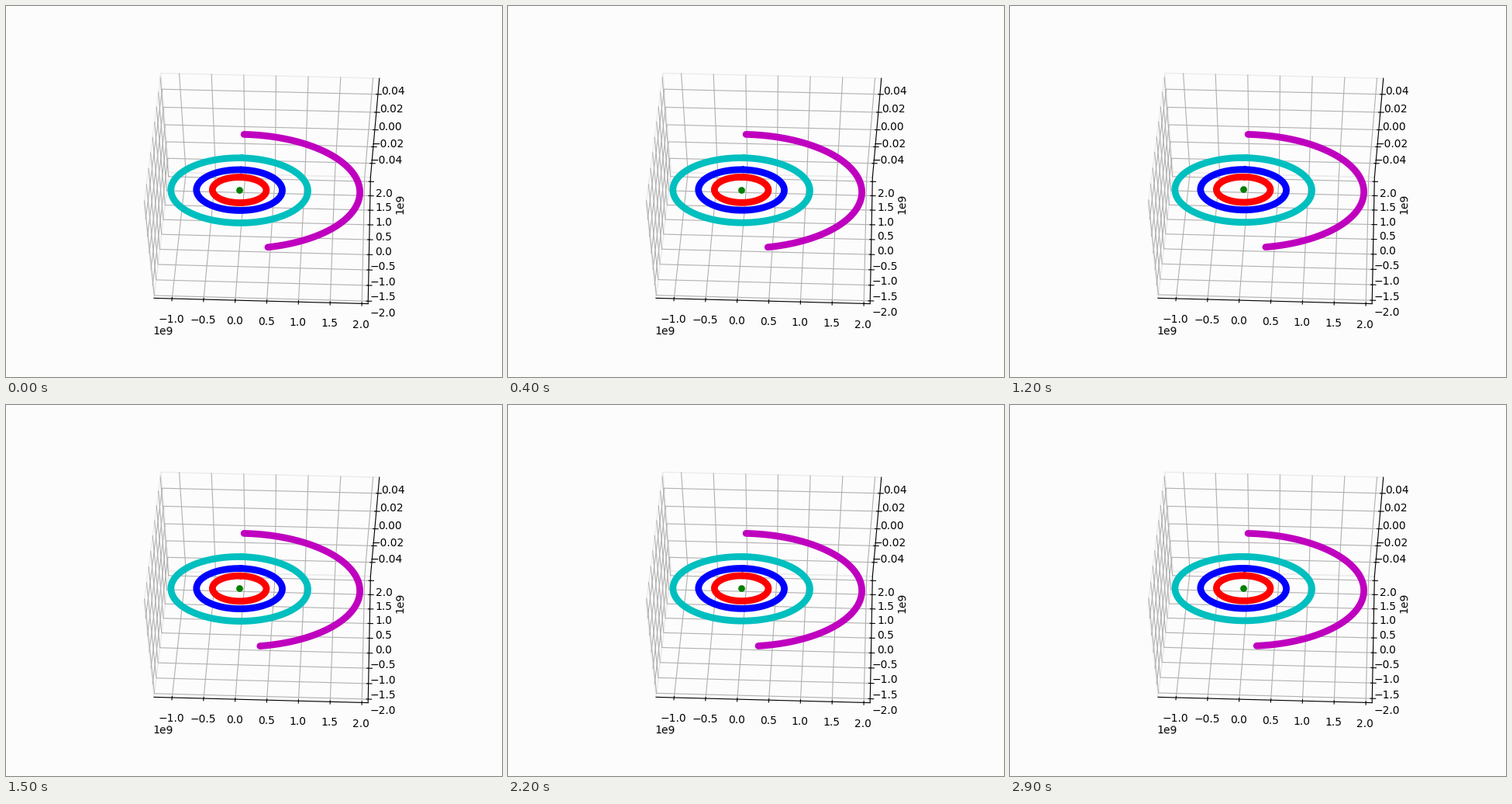
Recreate the animation shown at these times as a matplotlib script. Size 640x478 px, loop 3 s.

```python
import numpy as np
import matplotlib.pyplot as plt
from matplotlib.animation import FuncAnimation

W, H, DPI = 640, 478, 100
FRAMES, INTERVAL = 30, 100

# Camera and viewport
ELEV, TURN, DIST = np.radians(53), np.radians(2.4), 10
SIN_E, COS_E = np.sin(ELEV), np.cos(ELEV)
SIN_T, COS_T = np.sin(TURN), np.cos(TURN)
SCALE_X, SCALE_Y = 0.775 * W / 0.185, 0.77 * H / 0.185
CENTER_X = 0.125 * W + SCALE_X * 0.095
CENTER_Y = 0.89 * H - SCALE_Y * 0.095

# Box in units of the data range
EDGE = 0.5 + 1 / 48
LABEL = EDGE + 0.0739
TICK_IN, TICK_OUT = EDGE - 0.1 / 12, EDGE + 0.2 / 12

GRID, PANE, PAPER = "#b0b0b0", "#ececec", "#fcfcfc"

# Orbits: radius in 1e9 and colour
RINGS = [(0.4217, "r"), (0.671, "b"), (1.0704, "c")]
OUTER = 1.8827
START_GAP, STEP = 0.272, 0.00436  # radians left to half a turn, per frame

X_TICKS = np.arange(-2, 5) / 2
Y_TICKS = np.arange(-4, 5) / 2
Z_TICKS = np.arange(-2, 3) * 0.02

fig = plt.figure(figsize=(W / DPI, H / DPI), dpi=DPI, facecolor=PAPER)
ax = fig.add_axes([0, 0, 1, 1])


def limits(low, high):
    pad = 0.05 * (high - low)
    return low - pad, high + pad


def unit(value, lim):
    return (value - lim[0]) / (lim[1] - lim[0]) - 0.5


def project(x, y, z):
    right = x * COS_T + y * SIN_T
    up = SIN_E * (y * COS_T - x * SIN_T) + z * COS_E
    depth = DIST + COS_E * (y * COS_T - x * SIN_T) - z * SIN_E
    return CENTER_X + SCALE_X * right / depth, CENTER_Y - SCALE_Y * up / depth


def path(points, color, width=0.8, zorder=2):
    px, py = zip(*(project(*p) for p in points))
    ax.plot(px, py, color=color, lw=width, zorder=zorder,
            solid_capstyle="projecting")


def label(point, text):
    px, py = project(*point)
    ax.text(px, py, text.replace("-", "\u2212"), ha="center", va="top",
            fontsize=10, zorder=6)


def orbit(radius, sweep, color, x_lim, y_lim):
    angle = np.linspace(0, sweep, 240)
    px, py = project(unit(radius * np.sin(angle), x_lim),
                     unit(radius * np.cos(angle), y_lim), 0)
    ax.plot(px, py, color=color, lw=6.3, zorder=5,
            solid_capstyle="round", solid_joinstyle="round")


def draw_box(x_lim, y_lim):
    e = EDGE
    floor = [(-e, -e, -e), (e, -e, -e), (e, e, -e), (-e, e, -e)]
    back = [(-e, e, -e), (e, e, -e), (e, e, e), (-e, e, e)]
    left = [(-e, -e, -e), (-e, e, -e), (-e, e, e), (-e, -e, e)]
    for pane in (left, back, floor):
        path(pane + pane[:1], PANE, 1, 1)

    for value in X_TICKS:
        x = unit(value, x_lim)
        path([(x, -e, -e), (x, e, -e), (x, e, e)], GRID)
        path([(x, -TICK_IN, -e), (x, -TICK_OUT, -e)], "k", zorder=4)
        label((x, -LABEL, -LABEL), f"{value:.1f}")
    for value in Y_TICKS:
        y = unit(value, y_lim)
        path([(e, y, -e), (-e, y, -e), (-e, y, e)], GRID)
        path([(TICK_IN, y, -e), (TICK_OUT, y, -e)], "k", zorder=4)
        label((LABEL, y, -LABEL), f"{value:.1f}")
    for value in Z_TICKS:
        z = unit(value, (-0.055, 0.055))
        path([(e, e, z), (-e, e, z), (-e, -e, z)], GRID)
        path([(TICK_IN, e, z), (TICK_OUT, e, z)], "k", zorder=4)
        label((LABEL, LABEL, z), f"{value:.2f}")

    path([(-e, -e, -e), (e, -e, -e)], "k", zorder=3)
    path([(e, -e, -e), (e, e, -e)], "k", zorder=3)
    path([(e, e, -e), (e, e, e)], "k", zorder=3)
    for px, py, angle in ((203, 419.5, -1.5), (508.5, 254.5, 89)):
        ax.text(px, py, "1e9", rotation=angle, ha="center", va="center",
                fontsize=10)


def draw(frame):
    ax.clear()
    ax.set(xlim=(0, W), ylim=(H, 0))
    ax.axis("off")

    # The y range grows as the outer body nears its lowest point
    sweep = np.pi - START_GAP + STEP * frame
    x_lim = limits(-RINGS[-1][0], OUTER)
    y_lim = limits(OUTER * np.cos(sweep), OUTER)

    draw_box(x_lim, y_lim)
    for radius, color in RINGS:
        orbit(radius, 2 * np.pi, color, x_lim, y_lim)
    orbit(OUTER, sweep, "m", x_lim, y_lim)
    ax.plot(*project(unit(0, x_lim), unit(0, y_lim), 0), "o", color="g",
            ms=6.3, mew=0, zorder=5)
    return []


anim = FuncAnimation(fig, draw, frames=FRAMES, interval=INTERVAL,
                     repeat=True, repeat_delay=0)
plt.show()
```
